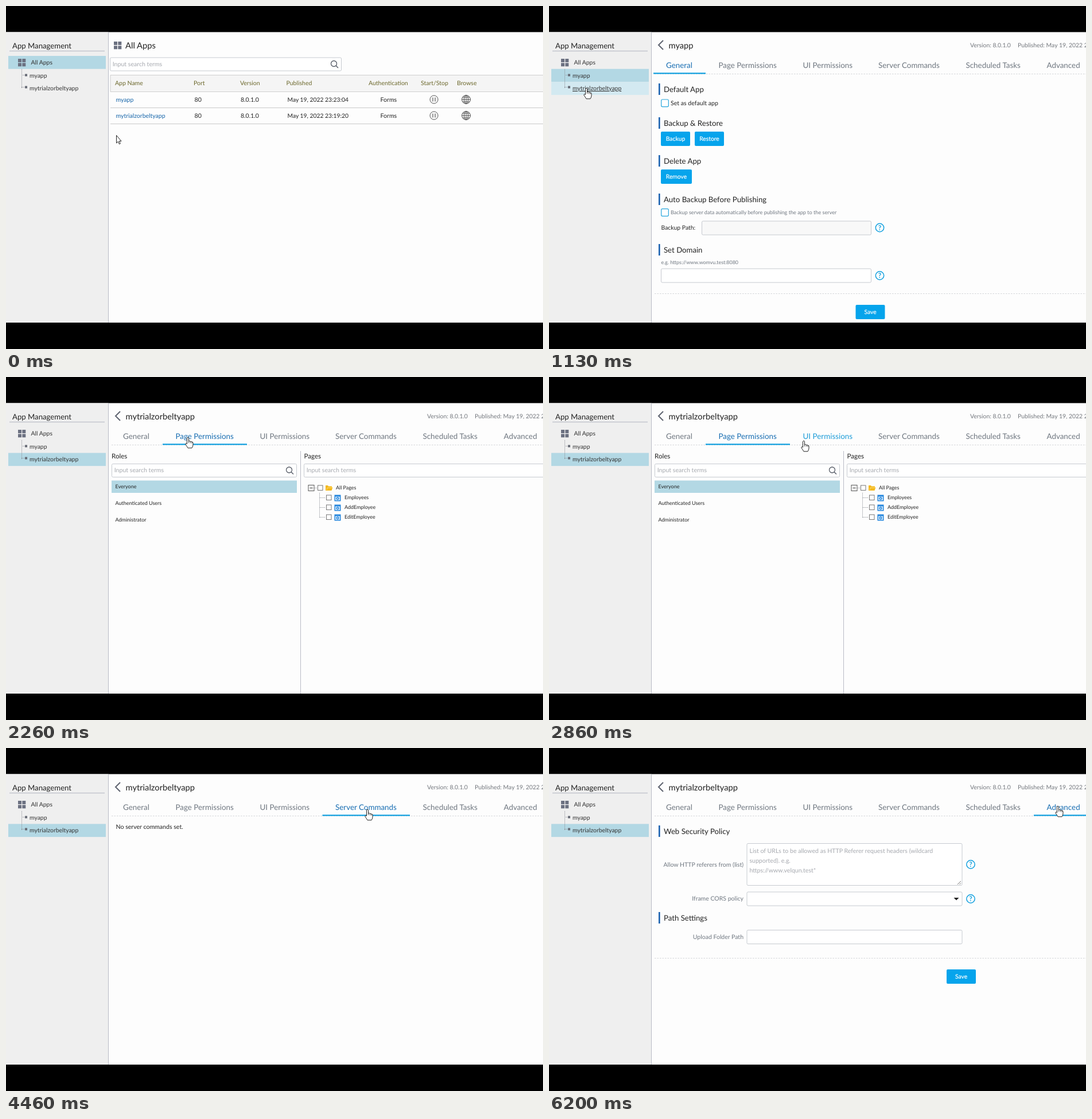
Recreate the animation shown at these times as an HTML page. Size 936 by 598 pixels, loop 6960 ms.

```html
<!DOCTYPE html>
<html lang="en">
<head>
<meta charset="utf-8">
<title>App Management</title>
<style>
html, body { margin: 0; width: 100%; height: 100%; overflow: hidden; background: #000; }
svg { display: block; width: 936px; height: 598px; font-family: Lato, "Open Sans", sans-serif; text-rendering: geometricPrecision; }
</style>
</head>
<body>
<svg id="stage" viewBox="0 0 936 598"></svg>
<script>
const LOOP = 6960;
const APP = 'mytrialzorbeltyapp';
const INK = '#222', GREY = '#6f7780', PALE = '#a6a9af', LINK = '#1766aa', OLIVE = '#6c682c';
const BLUE = '#06a4ec', PICK = '#b3d8e4', EDGE = '#c6cad0';

// Drawing helpers, each returning markup
const text = (x, y, s, size = 10.6, fill = INK, more = '') =>
  `<text x="${x}" y="${y}" font-size="${size}" fill="${fill}" ${more}>${s}</text>`;
const rect = (x, y, w, h, fill, more = '') =>
  `<rect x="${x}" y="${y}" width="${w}" height="${h}" fill="${fill}" ${more}/>`;
const path = (d, stroke, width = 1, more = '') =>
  `<path d="${d}" fill="none" stroke="${stroke}" stroke-width="${width}" ${more}/>`;
const ring = (x, y, r, stroke, width = 1) =>
  `<circle cx="${x}" cy="${y}" r="${r}" fill="none" stroke="${stroke}" stroke-width="${width}"/>`;
const group = (id, s) => `<g id="${id}">${s}</g>`;

const field = (x, y, w, h, fill = '#fff') => rect(x + .5, y + .5, w - 1, h - 1, fill, `stroke="${EDGE}" rx="2"`);
const search = (x, y, w) => field(x, y, w, 24) + text(x + 4.7, y + 15, 'Input search terms', 10.6, PALE) +
  ring(x + w - 13.5, y + 11, 5, '#555b66', 1.3) + path(`M${x + w - 10} ${y + 14.5}l4 4`, '#555b66', 1.5);
const button = (x, y, w, s) => rect(x, y, w, 25, BLUE, 'rx="2"') +
  text(x + w / 2, y + 16, s, 10.35, '#fff', 'text-anchor="middle" stroke="#fff" stroke-width=".2"');
const heading = (y, s) => rect(191, y - 10, 2.6, 20, '#1a62b0') + text(200, y + 5, s, 13.2);
const check = (y) => rect(195.7, y, 12.6, 12.6, '#fff', 'stroke="#25a5dc" stroke-width="1.2" rx="2"');
const help = (x, y) => ring(x, y, 7.2, '#12a0df', 1.5) +
  text(x, y + 4.2, '?', 12, '#12a0df', 'text-anchor="middle" font-weight="bold"');
const rule = y => path(`M184 ${y + .5}H936`, '#d3d5d8', 1, 'stroke-dasharray="2.5 2"');
const dots = d => path(d, '#8a8d94', 1, 'stroke-dasharray="1 1"');
const tiles = (x, y) => [0, 1, 2, 3].map(i => rect(x + i % 2 * 7.3, y + (i >> 1) * 7.3, 6, 6, '#6b7080')).join('');
const label = (y, s) => text(339, y, s, 10.5, GREY, 'text-anchor="end"');

function appRow(y, name, date) {
  return text(191.5, y + 4, name, 10.5, LINK) + text(328.5, y + 4, '80') + text(409, y + 4, '8.0.1.0', 10.5) +
    text(490.5, y + 4, date, 10.3) + text(652.5, y + 4, 'Forms') +
    ring(746, y, 7, '#555') + path(`M744 ${y - 3.5}v7m4 0v-7`, '#555', 1.2) +
    ring(802, y, 7.4, '#444') +
    `<ellipse cx="802" cy="${y}" rx="3.6" ry="7.4" fill="none" stroke="#444"/>` +
    path(`M794.6 ${y}h14.8M802 ${y - 7.4}v14.8M796 ${y - 4}h12m0 8h-12`, '#444', .9) +
    path(`M182 ${y + 14.5}H936`, '#c9c9c9');
}

const columns = [[190, 'App Name'], [327, 'Port'], [408, 'Version'], [488.5, 'Published'],
  [632, 'Authentication'], [723, 'Start/Stop'], [786, 'Browse']];

const treeBox = (x, y) => rect(x, y, 8.5, 8.5, '#fff', 'stroke="#777"');
const pageItem = (y, s) => dots(`M547 ${y + .5}h10`) + treeBox(558.5, y - 4) +
  rect(572.5, y - 4.5, 11, 11, '#2486dd') + rect(574, y - 1.5, 8, 6.5, '#d9ecfb') +
  ring(578, y + 1.8, 1.8, '#2486dd', 1.4) + text(590, y + 3.3, s, 8.95);

const bodies = {
  apps: tiles(188, 62) + text(208, 74, 'All Apps', 14.7) + search(181, 89.5, 404) +
    rect(182, 120, 754, 29, '#f5f5f5') + path('M936 120.5H182V149.5H936', '#cfcfcf') +
    columns.map(([x, s]) => text(x, 138, s, 10.5, OLIVE)).join('') +
    appRow(163, 'myapp', 'May 19, 2022 23:23:04') + appRow(191, APP, 'May 19, 2022 23:19:20'),
  general: heading(145, 'Default App') + check(163) + text(212, 173, 'Set as default app') +
    heading(204, 'Backup &amp; Restore') + button(195, 219, 51, 'Backup') + button(254, 219, 51, 'Restore') +
    heading(270, 'Delete App') + button(195, 285, 54, 'Remove') +
    heading(337, 'Auto Backup Before Publishing') + check(353.7) +
    text(212, 363, 'Backup server data automatically before publishing the app to the server', 9.15, GREY) +
    text(195.5, 390, 'Backup Path:', 10.4) + field(266, 374.5, 296, 25, '#f8f8f8') + help(576.5, 386.5) +
    heading(425, 'Set Domain') + text(195.5, 449.5, 'e.g. https://www.womvu.test:8080', 8.85, GREY) +
    field(195, 457.5, 367, 25) + help(576.5, 470) + rule(501) + button(534.5, 521, 51, 'Save'),
  pages: text(184, 142, 'Roles', 11.6) + search(184, 151, 323) + rect(184, 180.5, 323, 21.5, PICK) +
    ['Everyone', 'Authenticated Users', 'Administrator'].map((s, i) => text(190.5, 194 + 29 * i, s, 9)).join('') +
    path('M513.5 129V552', '#b9bcc6') + text(519.5, 142, 'Pages', 11.6) + search(519, 151, 480) +
    dots('M537 193.5h7M546.5 202V245') + rect(527, 188.5, 10, 10, '#fff', 'stroke="#555"') +
    path('M529.5 193.5h5', '#333') + treeBox(543.5, 189) +
    '<path d="M557 198v-9h4l1 1.5h6v2h1.5l-2 5.5z" fill="#f4b91e"/>' + path('M558.5 197l2-4h8', '#ffe08a', .8) +
    text(575, 196, 'All Pages', 8.95) +
    ['Employees', 'AddEmployee', 'EditEmployee'].map((s, i) => pageItem(210 + 17 * i, s)).join(''),
  ui: text(191.5, 140.5, 'No UI permissions set.'),
  server: text(191.5, 140.5, 'No server commands set.'),
  tasks: text(191.5, 140.5, 'No scheduled tasks set.'),
  advanced: heading(145, 'Web Security Policy') + field(344.5, 166, 376, 74) +
    ['List of URLs to be allowed as HTTP Referer request headers (wildcard', 'supported). e.g.',
      'https://www.velqun.test*'].map((s, i) => text(349.5, 183 + 17 * i, s, 10.55, PALE)).join('') +
    path('M712 238l6-6m-2.5 6l2.5-2.5', '#666', .9) + label(207, 'Allow HTTP referers from (list)') + help(735, 203) +
    field(344.5, 250.5, 376, 25) + '<path d="M705.5 261h9l-4.5 4.5z" fill="#222"/>' +
    label(266, 'Iframe CORS policy') + help(735, 263) +
    heading(296, 'Path Settings') + label(332.5, 'Upload Folder Path') + field(344.5, 317, 376, 25) +
    rule(366) + button(693, 386, 51, 'Save')
};

const rows = [[43.5, 102, 'All Apps'], [41, 125, 'myapp'], [41, 147, APP]];
const tabs = [[204, 'General'], [295.5, 'Page Permissions'], [442.5, 'UI Permissions'],
  [574, 'Server Commands'], [726.5, 'Scheduled Tasks'], [867.5, 'Advanced']];
const tabEdges = [182, 273, 420, 551.5, 704, 845, 947];
const rowTop = i => 87 + 22.7 * i;

const $ = id => document.getElementById(id);
$('stage').innerHTML =
  rect(0, 45.5, 936, 506.5, '#fdfdfd') + rect(0, 45.5, 178, 506.5, '#efefef') + path('M178.5 45.5V552', '#b9bcc6') +
  text(11, 74, 'App Management', 13.2) + path('M6 78.5H172', '#c3c6ce', 1.5) +
  rows.map((r, i) => rect(4, rowTop(i), 170, 22.7, PICK, `id="row${i}"`)).join('') +
  tiles(21, 92) + dots('M27.5 110V143M27 120.5h6M27 141.5h6') +
  rect(33, 118.5, 4, 4, '#666a75') + rect(33, 139.5, 4, 4, '#666a75') +
  rows.map(([x, y, s], i) => text(x, y, s, 10.4, '#333', `id="name${i}"`)).join('') +
  group('app', path('M199 60l-8 8 8 8', '#5f6470', 2) + text(208.5, 74, '', 14.7, INK, 'id="title"') +
    text(734, 72, 'Version: 8.0.1.0', 10.4, '#73777d') +
    text(817, 72, 'Published: May 19, 2022 23:19:20', 10.4, '#73777d') + rule(118) +
    tabs.map(([x, s], i) => text(x, 108, s, 13.4, GREY, `id="tab${i}"`)).join('') +
    rect(0, 116.3, 0, 2.2, '#0d9fe0', 'id="bar"')) +
  Object.entries(bodies).map(([id, s]) => group(id, s)).join('') +
  rect(0, 552, 936, 46, '#000') +
  `<g id="cursor" fill="#fff" stroke="#222" stroke-linejoin="round">
    <path id="arrow" d="M.5 0V13.5L3.4 10.8L5.4 15.3L7.3 14.4L5.4 10.1H9Z"/>
    <g id="hand"><path d="M-1.5 11.5V1.7Q-1.5 .4 0 .4T1.5 1.7V7Q4 5.6 4.3 7.6Q6.6 6.4 6.9 8.4Q9 7.6 9 10V13Q9 16 7 18.8H0Q-1.5 16-4 12.6Q-4.6 10.6-2.7 10.8Z"/>
    <path d="M1.5 7v3M4.3 7.6v2.8M6.9 8.4v2.4" stroke-width=".8"/></g></g>`;

// From a time on: selected row, tab and body
const states = [
  [0, 0, -1, 'apps'], [530, 1, 0, 'general'], [1230, 2, 0, 'general'],
  [2230, 2, 1, ''], [2260, 2, 1, 'pages'], [3500, 2, 2, ''], [3530, 2, 2, 'ui'],
  [4260, 2, 3, ''], [4300, 2, 3, 'server'], [5100, 2, 4, 'tasks'],
  [6160, 2, 5, ''], [6200, 2, 5, 'advanced']
];

// Pointer moves: start, end, x, y, vertical bow
const moves = [
  [30, 490, 57, 118, 0], [830, 1130, 65, 143, 0], [1530, 1860, 317, 105, 24],
  [2700, 2860, 444, 111, 88], [2860, 3260, 468, 98, 0], [3760, 4220, 611, 104, -6],
  [4445, 4460, 630, 107, 0], [4460, 4760, 757, 102, 8], [5460, 5860, 887, 101, 0]
];

function pointer(t) {
  let x = 192, y = 225.5;
  for (const [from, to, endX, endY, bow] of moves) {
    if (t < from) break;
    const k = Math.min(1, (t - from) / (to - from)), p = k * k * (3 - 2 * k);
    x += (endX - x) * p;
    y += (endY - y) * p + bow * Math.sin(Math.PI * p);
  }
  return [x, y];
}

const show = (id, on) => $(id).setAttribute('display', on ? 'inline' : 'none');

function draw(t) {
  const [, row, tab, body] = states.filter(s => s[0] <= t).pop();
  const [x, y] = pointer(t);
  const overRow = x > 4 && x < 174 && y >= 87 && y < 155 ? Math.floor((y - 87) / 22.7) : -1;
  const overTab = tab >= 0 && y > 90 && y < 119 ? tabEdges.findIndex((e, i) => x >= e && x < tabEdges[i + 1]) : -1;

  rows.forEach((r, i) => {
    show('row' + i, i === row || i === overRow);
    $('row' + i).setAttribute('fill', i === row ? PICK : '#d3e9f1');
    $('name' + i).setAttribute('text-decoration', i === overRow ? 'underline' : 'none');
  });
  show('app', tab >= 0);
  $('title').textContent = rows[row][2];
  tabs.forEach((s, i) => $('tab' + i).setAttribute('fill', i === tab ? '#176db2' : i === overTab ? '#1c9cd8' : GREY));
  if (tab >= 0) {
    $('bar').setAttribute('x', tabEdges[tab]);
    $('bar').setAttribute('width', tabEdges[tab + 1] - tabEdges[tab]);
  }
  for (const id in bodies) show(id, id === body);

  const hand = overRow >= 0 || overTab >= 0;
  show('hand', hand);
  show('arrow', !hand);
  $('cursor').setAttribute('transform', `translate(${x.toFixed(1)} ${y.toFixed(1)})`);
}

const start = performance.now();
function tick() {
  draw((performance.now() - start) % LOOP);
  requestAnimationFrame(tick);
}
tick();
</script>
</body>
</html>
```
